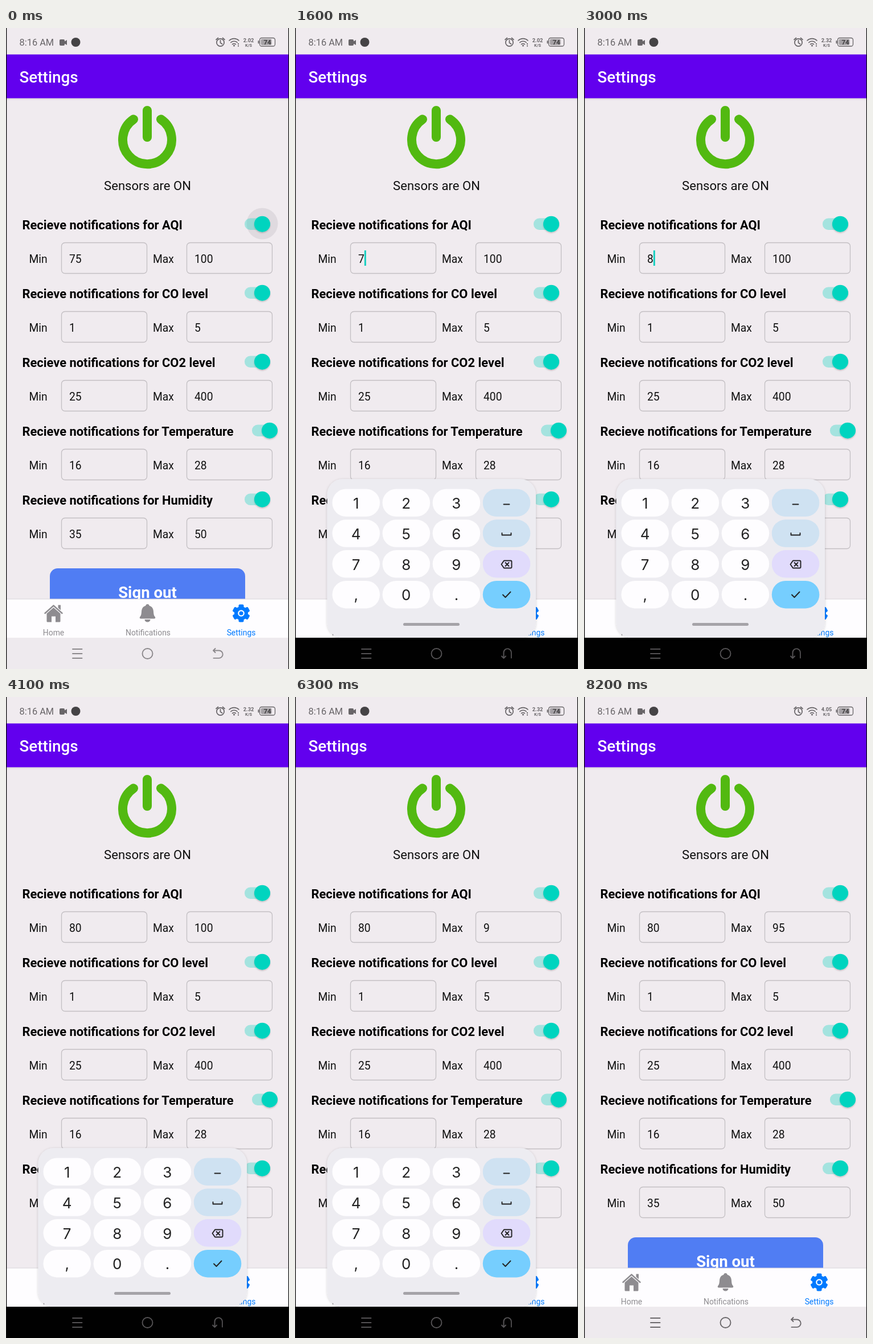
Animation of 497 by 1127 pixels, one loop 8300 ms. Source, as an HTML page:

```html
<!DOCTYPE html>
<html lang="en">
<head>
<meta charset="utf-8">
<title>Settings</title>
<style>
  html, body { margin: 0; width: 100%; height: 100%; overflow: hidden; background: #f0ebef; }
  svg { display: block; font-family: Roboto, "Noto Sans", sans-serif; }
  .mid { text-anchor: middle; }
  .line { fill: none; stroke-linecap: round; stroke-linejoin: round; }
  .heading { font-size: 21.9px; font-weight: 700; }
  .body { font-size: 19.3px; fill: #111; }
  .tab { font-size: 13.9px; fill: #8e8c90; }
  .key { font: 26px Inter, Roboto, sans-serif; fill: #222; }
  .ripple { animation: ripple 8.3s linear infinite; }
  .keyboard { animation: keyboard 8.3s linear infinite; }
  .navicons { animation: navicons 8.3s linear infinite; }
  .back { transform-origin: 372px 1100px; animation: back 8.3s ease infinite; }
  @keyframes ripple {
    0%, .6% { opacity: 1; }
    3.4%, 100% { opacity: 0; }
  }
  @keyframes keyboard {
    0%, 7% { transform: translateY(110px); opacity: 0; animation-timing-function: cubic-bezier(.2, 0, 0, 1); }
    10.6%, 91% { transform: none; opacity: 1; animation-timing-function: cubic-bezier(.4, 0, 1, 1); }
    94%, 100% { transform: translateY(110px); opacity: 0; }
  }
  @keyframes navicons {
    0%, 7% { stroke: #8c898c; }
    8.5%, 92% { stroke: #545254; }
    94%, 100% { stroke: #6c696c; }
  }
  @keyframes back {
    0%, 7% { transform: none; }
    9.4%, 92% { transform: rotate(-90deg); }
    95%, 100% { transform: none; }
  }
</style>
</head>
<body>
<svg width="497" height="1127" viewBox="0 0 497 1127">
  <defs>
    <filter id="soft" x="-30%" y="-30%" width="160%" height="160%">
      <feDropShadow dx="0" dy="1.5" stdDeviation="1.3" flood-opacity=".22"/>
    </filter>
    <filter id="panelShadow" x="-10%" y="-10%" width="120%" height="120%">
      <feDropShadow dx="0" dy="1" stdDeviation="2" flood-opacity=".18"/>
    </filter>
    <linearGradient id="fade" x2="0" y2="1">
      <stop stop-color="#000" stop-opacity=".08"/>
      <stop offset="1" stop-color="#000" stop-opacity="0"/>
    </linearGradient>
  </defs>

  <rect width="497" height="1127" fill="#f0ebef"/>

  <!-- Status bar -->
  <g fill="#686568">
    <text x="23.5" y="31" font-size="16.4">8:16 AM</text>
    <path d="M96 20h5a2 2 0 0 1 2 2v1.500l4-2.500v9l-4-2.500v1.500a2 2 0 0 1-2 2h-5a2 2 0 0 1-2-2v-7a2 2 0 0 1 2-2z"/>
    <circle cx="122.500" cy="25" r="8" fill="#454345"/>
    <g class="line" stroke="#686568" stroke-width="1.7">
      <circle cx="376.500" cy="25.500" r="6.600"/>
      <path d="M376.500 21.500v4.500l3 2M369 20.500l3.500-3M384 20.500l-3.500-3"/>
      <path d="M392 22a12.500 12.500 0 0 1 17 0M394.800 25.500a8.300 8.300 0 0 1 11.400 0M397.600 28.700a4.200 4.200 0 0 1 5.800 0"/>
    </g>
    <circle cx="400.500" cy="31" r="1.500"/>
    <path d="M407 27h2v2h-2zM407 30.500h2v2h-2z"/>
    <g class="mid" font-weight="600">
      <text id="speed" x="426" y="24.500" font-size="9.300">2.02</text>
      <text x="426" y="32.500" font-size="7.300">K/S</text>
    </g>
    <rect x="445.500" y="17.500" width="27" height="14.500" rx="3.500" fill="none" stroke="#686568" stroke-width="1.300"/>
    <rect x="442.500" y="22" width="2" height="5.500" rx="1"/>
    <rect x="447.500" y="19.500" width="19" height="10.500" rx="2" opacity=".55"/>
    <text class="mid" x="459" y="29" font-size="11.500" font-weight="700" fill="#3e3c3e">74</text>
  </g>

  <!-- Header -->
  <rect y="46.500" width="497" height="77" fill="#6200ee"/>
  <rect y="123.500" width="497" height="4" fill="url(#fade)"/>
  <text x="23.500" y="96" font-size="27.900" font-weight="500" fill="#fff">Settings</text>

  <!-- Power -->
  <path class="line" stroke="#52b911" stroke-width="16" d="M224 160.500a43 43 0 1 0 48 0M248 145v47"/>
  <text class="mid" x="248.500" y="284.500" font-size="22.100" fill="#111">Sensors are ON</text>

  <circle class="ripple" cx="450" cy="344" r="27.500" fill="#dfdadf"/>
  <g id="rows"></g>
  <rect id="caret" y="391" width="3" height="27" fill="#16cfc0"/>

  <rect x="77" y="950" width="343" height="80" rx="14" fill="#507df3"/>
  <text class="mid" x="248.500" y="1002" font-size="27.600" font-weight="700" fill="#fff">Sign out</text>

  <!-- Tabs -->
  <rect y="1004" width="497" height="68" fill="#fefdff"/>
  <rect y="1003.500" width="497" height="1" fill="#d9d5d9"/>
  <g fill="#8e8c90">
    <path d="M83.500 1019l12 10.500v13.500a1.500 1.500 0 0 1-1.500 1.500h-7v-10h-7v10h-7a1.500 1.500 0 0 1-1.500-1.500v-13.500z"/>
    <path class="line" stroke="#8e8c90" stroke-width="2.400" d="M68.500 1029l15-13.500 15 13.500"/>
    <path d="M91.500 1014.500h4.500v9l-4.500-4z"/>
    <path d="M248.500 1013c2 0 3 1.200 3.200 2.800 5 1.300 7 5.200 7.300 10.200.3 5 .8 7 2.800 9.500 1 1.500.3 3-1.500 3h-23.600c-1.800 0-2.500-1.500-1.500-3 2-2.500 2.500-4.500 2.800-9.500.3-5 2.300-8.900 7.300-10.200.2-1.600 1.200-2.800 3.200-2.800zM243.500 1040h10a5 4.500 0 0 1-10 0z"/>
  </g>
  <g id="gear" fill="#007aff"></g>
  <g class="tab mid">
    <text x="83.500" y="1068">Home</text>
    <text x="249.500" y="1068">Notifications</text>
    <text x="413" y="1068" style="fill:#007aff">Settings</text>
  </g>
  <rect y="1072" width="497" height="55" fill="#eeeaee"/>

  <!-- Floating number pad with its own dark navigation strip -->
  <g class="keyboard">
    <rect y="1072" width="497" height="55" fill="#010101"/>
    <rect x="56.500" y="793" width="366.500" height="279" rx="27" fill="#edecf1" filter="url(#panelShadow)"/>
    <g id="keys"></g>
    <g class="line" stroke="#222" stroke-width="1.900">
      <path d="M366.500 837.500h10M363.500 888v3.500h16v-3.500"/>
      <path d="M367 936.500h12a1.500 1.500 0 0 1 1.500 1.500v10a1.500 1.500 0 0 1-1.500 1.500h-12l-4.500-6.500zM369.500 940l6 6M375.500 940l-6 6"/>
      <path d="M365 996.500l4.500 4.500 9-9.500"/>
    </g>
    <rect x="190" y="1046" width="99" height="5" rx="2.500" fill="#a5a3a8"/>
  </g>

  <!-- System navigation -->
  <g class="navicons line" stroke-width="1.900">
    <path d="M117 1092h16.500M117 1100h16.500M117 1108h16.500"/>
    <circle cx="248.500" cy="1100" r="9"/>
    <path class="back" d="M367.500 1091l-3.500 3.500 3.500 3.500M364.500 1094.500h9.500a6.700 6.700 0 0 1 0 13.400h-9.500"/>
  </g>
  <path d="M0 0h1.300v1127H0zM495.800 0h1.200v1127h-1.200z" fill="#111"/>
</svg>

<script>
const $ = id => document.getElementById(id);

const settings = [
  ["AQI", 75, 100], ["CO level", 1, 5], ["CO2 level", 25, 400],
  ["Temperature", 16, 28], ["Humidity", 35, 50]
];
const field = (x, y, value) => `
  <rect x="${x}" y="${y + 32.5}" width="150" height="54" rx="6" fill="none" stroke="#c3bfc3" stroke-width="1.3"/>
  <text class="body value" x="${x + 13.5}" y="${y + 67.5}">${value}</text>`;

$("rows").innerHTML = settings.map(([name, min, max], i) => {
  const y = 345 + i * 121, shift = name === "Temperature" ? 13 : 0;
  return `
    <text class="heading" x="28.500" y="${y + 8.5}">Recieve notifications for ${name}</text>
    <rect x="${419 + shift}" y="${y - 10.5}" width="42" height="20.500" rx="10" fill="#06d4bf" opacity=".32"/>
    <circle cx="${450 + shift}" cy="${y - .3}" r="14" fill="#06d4bf" filter="url(#soft)"/>
    <text class="body" x="40.500" y="${y + 67.5}">Min</text>
    <text class="body" x="258" y="${y + 67.5}">Max</text>
    ${field(97.5, y, min)}${field(317.5, y, max)}`;
}).join("");

$("gear").innerHTML = [0, 60, 120].map(a =>
  `<rect x="408.500" y="1013.500" width="9" height="31" rx="2" transform="rotate(${a} 413 1029)"/>`
).join("") + `<circle cx="413" cy="1029" r="12"/>
  <circle cx="413" cy="1029" r="5.800" fill="#fff"/><circle cx="413" cy="1029" r="3.600"/>`;

const sideColors = ["#cfe2f2", "#cfe2f2", "#e1dbfc", "#76cefe"];
$("keys").innerHTML = ["123", "456", "789", ",0."].map((row, r) =>
  [...row, ""].map((label, c) => {
    const x = 65.5 + c * 88.1, y = 810.5 + r * 53.8;
    return `<rect x="${x}" y="${y}" width="83.500" height="48.500" rx="24" fill="${c === 3 ? sideColors[r] : "#fefdff"}"/>
      <text class="key mid" x="${x + 41.7}" y="${y + 34.5}">${label}</text>`;
  }).join("")
).join("");

// Edits: time, min, max, focused field (0 min, 1 max, -1 none)
const edits = [
  [0, "75", "100", -1],
  [500, "75", "100", 0],
  [1500, "7", "100", 0],
  [1900, "", "100", 0],
  [2900, "8", "100", 0],
  [3400, "80", "100", 0],
  [4350, "80", "100", 1],
  [4650, "80", "10", 1],
  [4850, "80", "1", 1],
  [5050, "80", "", 1],
  [5800, "80", "9", 1],
  [6400, "80", "95", 1],
  [7550, "80", "95", -1]
];
const values = [...document.querySelectorAll(".value")].slice(0, 2);
const start = performance.now();

function draw() {
  const t = (performance.now() - start) % 8300;
  const [since, min, max, focus] = edits.findLast(e => e[0] <= t);
  values[0].textContent = min;
  values[1].textContent = max;
  $("speed").textContent = t < 1900 ? "2.02" : t < 6800 ? "2.32" : "4.05";

  const visible = focus >= 0 && (t - since) % 1000 < 500;
  $("caret").style.opacity = visible ? 1 : 0;
  if (visible) {
    const text = values[focus];
    const width = text.textContent ? text.getComputedTextLength() : 0;
    $("caret").setAttribute("x", +text.getAttribute("x") + width);
  }
  requestAnimationFrame(draw);
}
draw();
</script>
</body>
</html>
```
